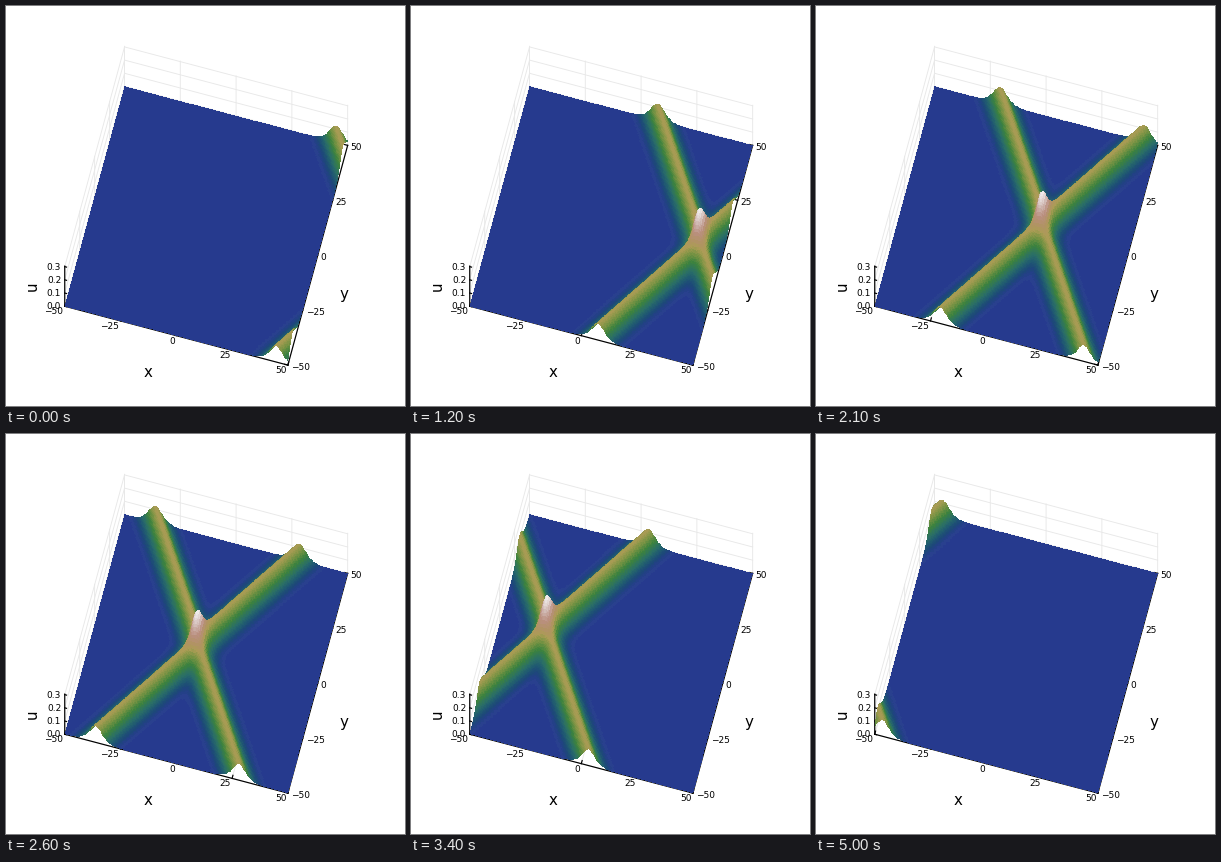
Animation of 399 by 400 pixels, one loop 5050 ms. Source, as a matplotlib script:

```python
import numpy as np
import matplotlib.pyplot as plt
from matplotlib.animation import FuncAnimation
from matplotlib.colors import LinearSegmentedColormap, Normalize

W, H, DPI = 399, 400, 100
FRAMES, INTERVAL = 101, 50
PX = 72 / DPI

# Orthographic view: azimuth 15 degrees, elevation 80 degrees
SIDE = 231.0
AZ, EL = np.radians(15), np.radians(80)
Z_TOP = 0.304
CENTER = (200.2, 219.8)

# Two line solitons of equal height, mirrored in y
K = 0.5
SLOPE = 0.66
SPEED = 3 * SLOPE**2 + K**2
LOG_A = np.log(SLOPE**2 / (SLOPE**2 - K**2))

# Colours change fast near the floor, slowly near the top
STOPS = [
    (0.000, (38, 58, 142)), (0.004, (41, 64, 142)), (0.009, (35, 64, 134)),
    (0.020, (29, 72, 121)), (0.045, (32, 90, 113)), (0.090, (42, 110, 103)),
    (0.140, (51, 121, 82)), (0.190, (60, 130, 62)), (0.290, (112, 145, 66)),
    (0.370, (147, 152, 75)), (0.420, (172, 156, 86)), (0.500, (176, 147, 98)),
    (0.650, (186, 143, 127)), (0.800, (206, 181, 175)),
    (1.000, (241, 238, 238)),
]
CMAP = LinearSegmentedColormap.from_list(
    "relief", [(p, tuple(v / 255 for v in c)) for p, c in STOPS])


def project(x, y, z=0.0):
    """Stage pixels of a point in the box."""
    a, b, c = x / 100, y / 100, z / Z_TOP
    px = CENTER[0] + SIDE * (a * np.cos(AZ) + b * np.sin(AZ))
    depth = a * np.sin(AZ) - b * np.cos(AZ)
    py = CENTER[1] + SIDE * (depth * np.sin(EL) - c * np.cos(EL))
    return px, py


def height(x, y, t):
    """u = 2 (log tau)_xx for the two-soliton tau function."""
    base = K * (x + SPEED * t)
    tilt = K * SLOPE * y
    phases = np.array([0 * base, base + tilt, base - tilt, 2 * base + LOG_A])
    w = np.exp(phases - phases.max(axis=0))
    w /= w.sum(axis=0)
    mean = K * (w[1] + w[2] + 2 * w[3])
    square = K**2 * (w[1] + w[2] + 4 * w[3])
    return 2 * (square - mean**2)


fig = plt.figure(figsize=(W / DPI, H / DPI), dpi=DPI, facecolor="white")
ax = fig.add_axes([0, 0, 1, 1])
ax.set_xlim(0, W)
ax.set_ylim(H, 0)
ax.axis("off")
ax.set_autoscale_on(False)


def line(p, q, color="black", width=1.2, z=1):
    (x0, y0), (x1, y1) = project(*p), project(*q)
    ax.plot([x0, x1], [y0, y1], color=color, lw=width * PX, zorder=z,
            snap=False)


def label(x, y, s, size=9, ha="center", rot=0):
    ax.text(x, y, s, fontsize=size * PX, family="DejaVu Sans", ha=ha,
            va="center", rotation=rot, zorder=4)


def grid(p, q):
    line(p, q, color="#e8e8e8", width=0.9, z=0)


def draw_box():
    ticks = (-50, -25, 0, 25, 50)
    levels = (0.0, 0.1, 0.2, 0.3)
    for v in ticks:
        grid((v, 50, 0), (v, 50, Z_TOP))
        grid((-50, v, 0), (-50, v, Z_TOP))
        grid((v, -50, 0), (v, 50, 0))
        grid((-50, v, 0), (50, v, 0))
    for u in levels:
        grid((-50, 50, u), (50, 50, u))
        grid((-50, -50, u), (-50, 50, u))

    line((-50, -50, 0), (50, -50, 0))
    line((50, -50, 0), (50, 50, 0))
    line((-50, -50, 0), (-50, -50, Z_TOP))

    for v in ticks:
        text = str(v).replace("-", "\u2212")
        line((v, -50, 0), (v, -48.6, 0))
        line((50, v, 0), (48.6, v, 0))
        px, py = project(v, -50)
        label(px - 1.3, py + 5.4, text, ha="right")
        px, py = project(50, v)
        label(px + 3, py + 2.1, text, ha="left")
    for u in levels:
        line((-50, -50, u), (-49.2, -50, u))
        px, py = project(-50, -50, u)
        label(px - 3.6, py + 0.4, f"{u:.1f}", ha="right")

    label(142, 366.7, "x", 15)
    label(338, 288.5, "y", 15)
    label(26, 279.8, "u", 15, rot=90)


draw_box()

# Rows run from back to front, so nearer cells cover farther ones
N = 181
X, Y = np.meshgrid(np.linspace(-50, 50, N), np.linspace(50, -50, N))


def update(i):
    for old in list(ax.collections):
        old.remove()
    u = height(X, Y, i - 50)
    cell = (u[1:, 1:] + u[1:, :-1] + u[:-1, 1:] + u[:-1, :-1]) / 4
    px, py = project(X, Y, u)
    mesh = ax.pcolormesh(px, py, cell, cmap=CMAP, norm=Normalize(0, 0.3),
                         shading="flat", antialiased=False, zorder=2)
    return [mesh]


anim = FuncAnimation(fig, update, frames=FRAMES, interval=INTERVAL,
                     init_func=lambda: update(0), repeat=True,
                     repeat_delay=0, blit=False)
plt.show()
```
